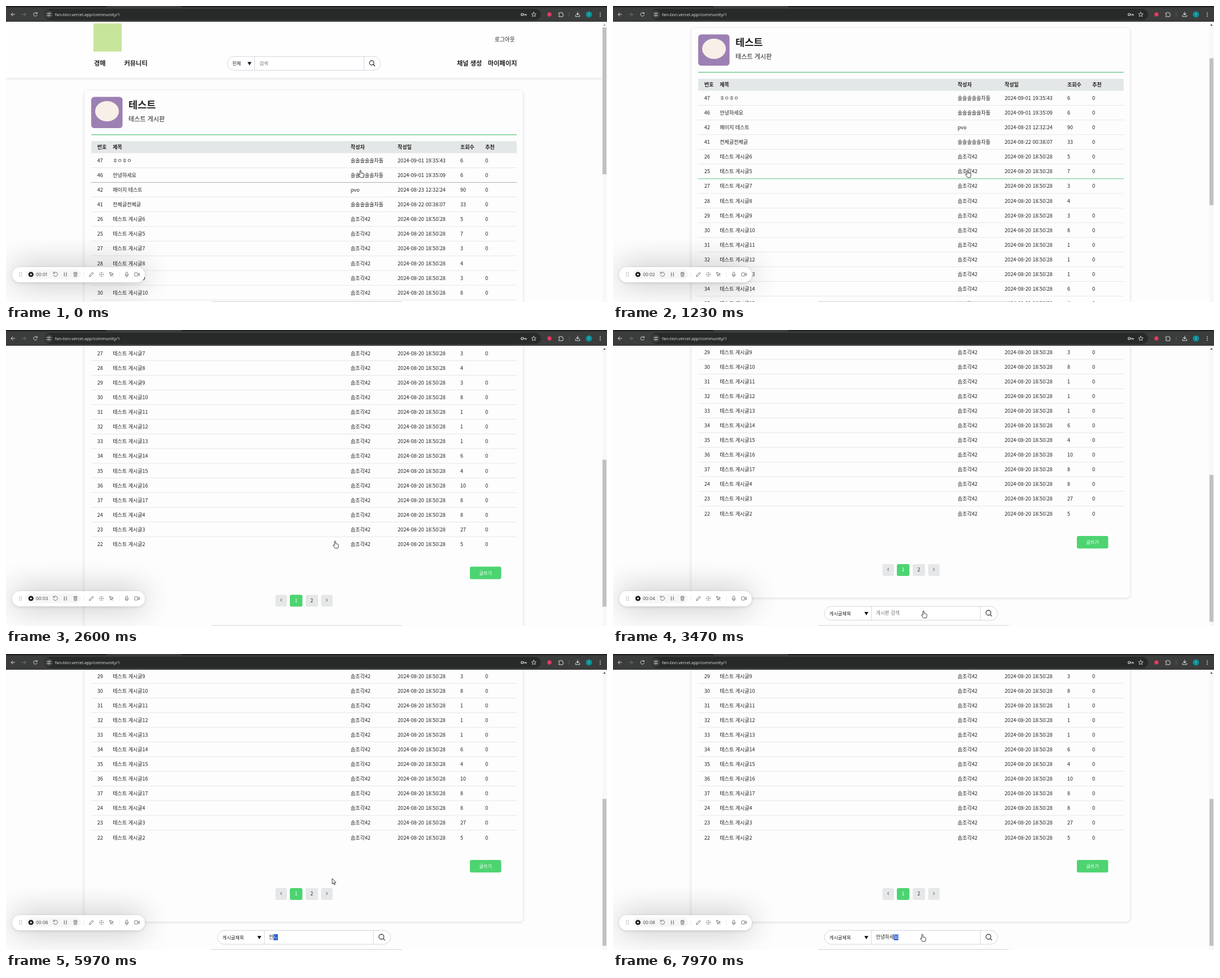
An HTML page for the animation above (8000 ms loop, 1065x526 px).

```html
<!DOCTYPE html>
<html lang="ko">
<head>
<meta charset="utf-8">
<title>게시판</title>
<style>
  html, body { margin: 0; width: 100%; height: 100%; overflow: hidden; background: #fdfdfd; }
  svg { display: block; width: 100%; height: 100%; }
  text { font-family: "Noto Sans CJK KR", "Noto Sans CJK", sans-serif; fill: #222; white-space: pre; }
  .line { fill: none; stroke-linecap: round; stroke-linejoin: round; }
</style>
</head>
<body>
<svg id="stage" viewBox="0 0 1065 526" xmlns="http://www.w3.org/2000/svg"></svg>
<script>
const LOOP = 8000;
const GREEN = '#4dd471';
const ROW_TOP = 261.4, ROW_H = 26.08;
const INPUT_X = 466, INPUT_SIZE = 8.6, GLYPH = INPUT_SIZE * 0.92;

const rect = (x, y, w, h, fill, extra = '') =>
  `<rect x="${x}" y="${y}" width="${w}" height="${h}" fill="${fill}" ${extra}/>`;
const circle = (x, y, r, fill, extra = '') =>
  `<circle cx="${x}" cy="${y}" r="${r}" fill="${fill}" ${extra}/>`;
const line = (d, stroke, width = 1, extra = '') =>
  `<path class="line" d="${d}" stroke="${stroke}" stroke-width="${width}" ${extra}/>`;
const label = (x, y, size, str, extra = '') =>
  `<text x="${x}" y="${y}" font-size="${size}" ${extra}>${str}</text>`;
const bold = 'font-weight="700"';

// Board data
const ids = [47, 46, 42, 41, 26, 25, ...Array.from({ length: 11 }, (_, i) => 27 + i), 24, 23, 22];
const views = [6, 6, 90, 33, 5, 7, 3, 4, 3, 8, 1, 1, 1, 6, 4, 10, 8, 8, 27, 5];
const fan = '솔솔솔솔솔차돌';
const special = {
  47: ['ㅎㅇㅎㅇ', fan, '2024-09-01 19:35:43'],
  46: ['안녕하세요', fan, '2024-09-01 19:35:09'],
  42: ['페이지 테스트', 'pvo', '2024-08-23 12:32:24'],
  41: ['전체글전체글', fan, '2024-08-22 00:38:07'],
};

function boardRow(id, i) {
  const [title, author, date] =
    special[id] || ['테스트 게시글' + (id - 20), '솜조각42', '2024-08-20 18:50:28'];
  const y = ROW_TOP + ROW_H * i + 16.6;
  const border = ROW_TOP + ROW_H * (i + 1);
  return label(161.7, y, 9.02, id) + label(189.3, y, 9.02, title) + label(610.8, y, 9.02, author) +
    label(694, y, 9.15, date) + label(805, y, 9.02, views[i]) +
    (id === 28 ? '' : label(849.3, y, 9.02, 0)) +
    (i < ids.length - 1 ? line(`M151 ${border}H905`, '#e5e7eb', 1, `id="border${i}"`) : '');
}

function searchBar(x, y, w, split, button, caption, lens) {
  const mid = y + 12.3, lx = (button + x + w) / 2 - 1;
  return rect(x, y, w, 24.6, '#fff', 'rx="12.3" stroke="#cfd2dc" stroke-width=".9"') +
    line(`M${split} ${y}v24.6M${button} ${y}v24.6`, '#cfd2dc', 0.9) +
    label(x + 8.6, mid + 3, 8.32, caption) +
    `<path d="M${split - 12.6} ${mid - 2.6}h7l-3.5 6z" fill="#111"/>` +
    circle(lx, mid - 1, lens, 'none', 'stroke="#222" stroke-width="1.1"') +
    line(`M${lx + lens * .7} ${mid - 1 + lens * .7}l2.8 2.8`, '#222', 1.2);
}

function header() {
  return rect(0, 28, 1057, 99.5, '#fefefe', 'filter="url(#soft)"') +
    rect(155, 31, 50, 50, '#c8e59c') +
    label(866, 62.7, 9.7, '로그아웃') +
    label(156, 106.3, 11.2, '경매', bold) + label(209.5, 106.3, 11.2, '커뮤니티', bold) +
    label(799, 106.3, 11.2, '채널 생성', bold) + label(854, 106.3, 11.2, '마이페이지', bold) +
    searchBar(392.4, 89.7, 271.2, 440.6, 634.5, '전체', 3.9) +
    label(449, 105, 8.5, '검색', 'style="fill:#777"');
}

function pager() {
  const button = (x, w, fill) => rect(x, 860, w, 21, fill, 'rx="3"');
  return button(477.5, 20.3, '#e5e7e8') + button(503, 22.3, GREEN) +
    button(531, 22, '#e5e7e8') + button(558.5, 20.3, '#e5e7e8') +
    line('M488.5 867.3l-2 2.2l2 2.2M567.6 867.3l2 2.2l-2 2.2', '#333', 0.9) +
    label(514.1, 873.3, 8.3, 1, 'text-anchor="middle" style="fill:#fff"') +
    label(541.9, 873.3, 8.3, 2, 'text-anchor="middle"');
}

function board() {
  const heads = [[161.7, '번호'], [189.3, '제목'], [610.8, '작성자'], [694, '작성일'], [805, '조회수'], [849.3, '추천']];
  return rect(139.3, 150.3, 776.7, 769, '#fdfdfd', 'rx="6" filter="url(#soft)"') +
    rect(151, 161.5, 55.5, 55.5, '#9d80b3', 'rx="5.5"') +
    `<ellipse cx="179" cy="187" rx="21" ry="18" fill="#f8efe8"/>` +
    label(217, 182.3, 17.6, '테스트', bold) + label(217, 204.7, 11.1, '테스트 게시판') +
    rect(151, 228, 754, 1.4, '#6bc98a') +
    rect(151, 240.3, 754, 21.2, '#e4e7e7') +
    heads.map(([x, s]) => label(x, 254.2, 9.02, s, bold)).join('') +
    ids.map(boardRow).join('') +
    rect(822, 810, 55.5, 22.3, GREEN, 'rx="3"') +
    label(849.7, 824.1, 8.1, '글쓰기', 'text-anchor="middle" style="fill:#fff"') +
    pager();
}

function postSearch() {
  return searchBar(374.7, 935.2, 306.8, 458, 651, '게시글제목', 4.4) +
    rect(0, 942, GLYPH, 10.6, '#2b5fcf', 'id="mark"') +
    label(INPUT_X, 950.4, INPUT_SIZE, '', 'id="typed"') +
    rect(466.2, 942.6, 0.8, 9, '#222', 'id="caret"');
}

function browserBar() {
  const c = '#dadada';
  return rect(0, 0, 1065, 28, '#3b3c3c') +
    rect(0, 0, 178, 2.2, '#1f2020') + rect(311, 0, 754, 2.2, '#1f2020') +
    rect(68, 5, 880, 20, '#282929', 'rx="10"') +
    line('M15.5 15h-6.5m3-3l-3 3l3 3', c) +
    line('M28.5 15h6.5m-3-3l3 3l-3 3', '#777') +
    line('M54.6 13a3.2 3.2 0 1 0 .5 2.9M55.2 11.4v2h-2', c) +
    circle(76, 15, 7, '#3e3f3f') +
    line('M72.8 13.2h2M78 13.2h1.4M72.8 17h1.3M77.2 17h2', c) +
    circle(76.4, 13.2, 1.1, 'none', `stroke="${c}" stroke-width=".8"`) +
    circle(75.6, 17, 1.1, 'none', `stroke="${c}" stroke-width=".8"`) +
    label(86.7, 17.8, 7.55, 'fan-tion.vercel.app/community/1',
      `style="fill:#e4e4e4;font-family:'Open Sans','Noto Sans',sans-serif"`) +
    circle(914.8, 15, 2, 'none', `stroke="${c}" stroke-width="1.2"`) +
    line('M917 15h5v1.8M919.8 15v1.6', c, 1.2) +
    line('M935.3 11l1.2 2.7l2.9.3l-2.2 1.9l.7 2.9l-2.6-1.5l-2.6 1.5l.7-2.9l-2.2-1.9l2.9-.3z', c, 0.9) +
    circle(963, 15, 3.7, '#e23a62') +
    line('M979.8 12.3h2.2a1.2 1.2 0 0 1 2.4 0h2.2v2.2a1.2 1.2 0 0 1 0 2.4v2.1h-6.8v-2.2a1.2 1.2 0 0 0 0-2.4z', c) +
    line('M998 11.5v7', '#666', 0.8) +
    line('M1013 10.8v5m-2.3-2.2l2.3 2.3l2.3-2.3M1009.4 16.4v2.4h7.2v-2.4', c, 1.1) +
    circle(1033, 15, 5.6, '#0b8f97') +
    label(1033, 17, 5.5, 'I', 'text-anchor="middle" style="fill:#fff"') +
    [11.8, 15, 18.2].map(y => circle(1053, y, 0.9, c)).join('');
}

function recorder() {
  const c = '#6b6e73';
  const dots = [24, 27.4].map(x => [474, 477, 480].map(y => circle(x, y, 0.75, '#888')).join('')).join('');
  const sparkle = [-3, 0, 3].map(dx => [-3, 0, 3].map(dy =>
    circle(169 + dx, 477 + dy, dx && dy ? 0.55 : 0.9, c)).join('')).join('');
  return rect(11, 464, 235, 27, '#000', 'rx="13.5" opacity=".3" filter="url(#glow)"') +
    rect(11, 464, 235, 27, '#fff', 'rx="13.5" filter="url(#soft)"') +
    rect(35, 468.5, 98, 17, '#f6f6f7', 'rx="8.5"') +
    dots + circle(44.2, 477, 4.6, '#1d1f22') + circle(44.2, 477, 1.6, '#fff') +
    label(53, 479.8, 7.7, '', `id="clock" style="fill:#44474c;font-family:Inter,Roboto,sans-serif"`) +
    line('M84.4 474.6a3.8 3.8 0 1 1-.4 3.6M84 472.8v2.4h2.4', c) +
    line('M103.3 473.8v6.4M107 473.8v6.4', c, 1.2) +
    line('M119.6 474.6h6.8M121.7 474.5v-1.4h2.6v1.4M120.5 474.8l.4 6h4.2l.4-6M122.3 476.6v2.4M123.8 476.6v2.4', c, 0.9) +
    line('M138 472.5v9M201 472.5v9', '#e6e6e6', 0.8) +
    line('M147.8 480.4l.5-2.2l5-5l1.7 1.7l-5 5z', c) + sparkle +
    line('M183.6 473.6l2.2 6.6l1.3-2.7l2.8-1.2zM187.3 477.6l2.5 2.6', c) +
    rect(212.4, 472.8, 3.2, 5.4, 'none', `rx="1.6" stroke="${c}" stroke-width=".9"`) +
    line('M211 477a3.1 3.1 0 0 0 6.2 0M214.1 480.2v1.4', c, 0.9) +
    rect(227.8, 474, 5.8, 6, 'none', `rx="1.2" stroke="${c}" stroke-width=".9"`) +
    line('M233.8 476.3l2.6-1.5v4.4l-2.6-1.5z', c, 0.9);
}

const handPath = 'M-.9 1.1c0-1.5 2.1-1.5 2.1 0v3.6l3.6.8c1.2.3 1.6 1 1.5 2l-.5 3.4c-.1.8-.5 1.4-.8 1.9H.3L-3 8.6c-.9-1.2.6-2.3 1.5-1.4l.6.7z';
const arrowPath = 'M0 0v9.7l2.2-2l1.5 3.4l1.6-.7l-1.5-3.3l3-.1z';
const pointer = (id, d) => `<path id="${id}" d="${d}" fill="#fff" stroke="#222" stroke-width=".9" stroke-linejoin="round"/>`;

const stage = document.getElementById('stage');
stage.innerHTML = `<defs>
    <filter id="soft" x="-10%" y="-30%" width="120%" height="160%">
      <feDropShadow dx="0" dy="1" stdDeviation="2.4" flood-color="#223" flood-opacity=".16"/></filter>
    <filter id="glow" filterUnits="userSpaceOnUse" x="-120" y="340" width="500" height="290">
      <feGaussianBlur stdDeviation="27"/></filter>
  </defs>` +
  rect(0, 0, 1065, 526, '#fdfdfd') +
  `<g id="page">${header()}${board()}${postSearch()}</g>` +
  rect(1056.3, 28, 8.7, 498, '#f8f8f8') +
  `<path id="up" d="M1058.2 35h4.6l-2.3-3z"/>` +
  rect(1057, 38, 7, 261, '#c1c1c1', 'id="thumb"') +
  recorder() +
  rect(363, 524.4, 339, 6, '#dedfe0', 'rx="2"') +
  browserBar() +
  pointer('hand', handPath) + pointer('arrow', arrowPath);

const $ = id => document.getElementById(id);
const set = (id, attrs) => Object.entries(attrs).forEach(([k, v]) => $(id).setAttribute(k, v));
const show = (id, on) => set(id, { visibility: on ? 'visible' : 'hidden' });
const ease = p => { p = Math.min(1, Math.max(0, p)); return p * p * (3 - 2 * p); };

// Four wheel notches
const notches = [640, 1400, 2290, 2520];
const scrollAt = t => notches.reduce((sum, start) => sum + 111 * ease((t - start) / 160), 0);

// Pointer moves: start, end, target x, target y
const moves = [[2190, 2570, 583, 375], [2850, 3300, 550, 499], [3950, 4400, 578, 399], [7200, 7750, 548, 498]];
function pointerAt(t) {
  let x = 628, y = 292;
  for (const [start, end, tx, ty] of moves) {
    const p = ease((t - start) / (end - start));
    x += (tx - x) * p;
    y += (ty - y) * p;
  }
  return [x, y];
}

// Hovered row from a given time on
const hovers = [[0, 1], [870, 5], [1610, 9], [2450, -1]];
const FOCUS = 3700, TYPE_START = 5560, KEY = 105;
const strokes = 'ㅇ 아 안 안ㄴ 안녀 안녕 안녕ㅎ 안녕하 안녕핫 안녕하세 안녕하셍 안녕하세요'.split(' ');

function draw(t) {
  const scroll = scrollAt(t);
  set('page', { transform: `translate(0 ${-scroll})` });
  set('thumb', { y: 38 + scroll * 0.4944 });
  set('up', { fill: scroll ? '#505050' : '#a3a3a3' });

  const hovered = hovers.filter(h => h[0] <= t).pop()[1];
  for (let i = 0; i < ids.length - 1; i++) {
    const color = i !== hovered ? '#e5e7eb' : t < 60 ? '#a9b2ae' : '#5fca85';
    set('border' + i, { stroke: color });
  }

  const key = Math.min(strokes.length - 1, Math.floor((t - TYPE_START) / KEY));
  const typing = key >= 0;
  const value = typing ? strokes[key] : '게시판 검색';
  const last = typing ? value.length - 1 : 0;
  $('typed').innerHTML = typing
    ? `${value.slice(0, last)}<tspan fill="#fff">${value[last]}</tspan>` : value;
  $('typed').style.fill = typing ? '#222' : '#777';
  set('mark', { x: INPUT_X + last * GLYPH });
  show('mark', typing);
  show('caret', !typing && t >= FOCUS && (t - FOCUS) % 1060 < 530);

  $('clock').textContent = '00:0' + Math.floor(1 + t / 1000);

  const [x, y] = pointerAt(t);
  const overField = y > 491 && y < 516 && x > 375 && x < 681;
  const clickable = y + scroll < 783 || overField;
  set('hand', { transform: `translate(${x} ${y})` });
  set('arrow', { transform: `translate(${x} ${y})` });
  show('hand', clickable);
  show('arrow', !clickable);
}

const origin = performance.now();
function tick() {
  draw((performance.now() - origin) % LOOP);
  requestAnimationFrame(tick);
}
tick();
</script>
</body>
</html>
```
